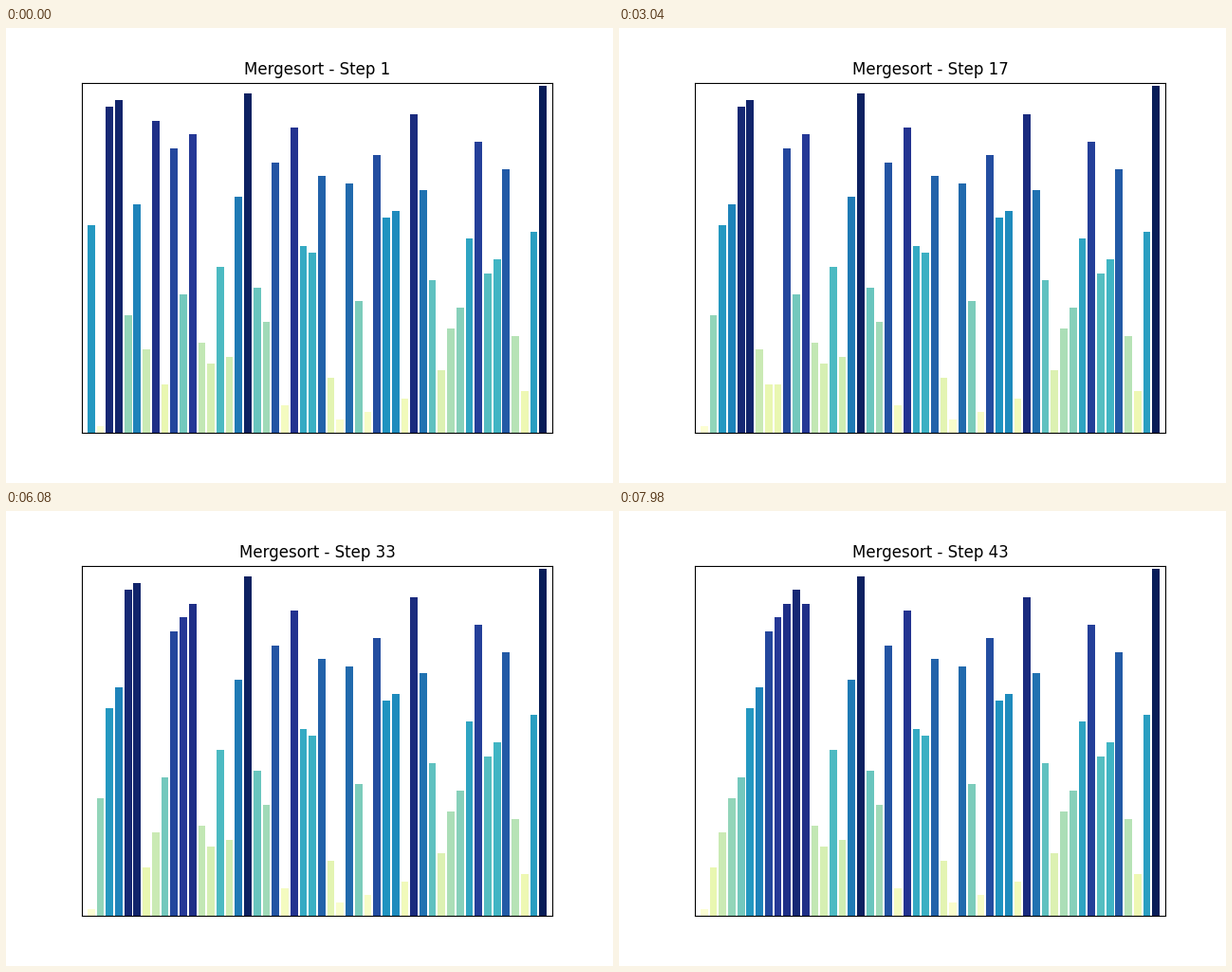
A matplotlib script for the animation above (8000 ms loop, 640 by 480 pixels).

```python
from itertools import islice

import matplotlib.pyplot as plt
from matplotlib.animation import FuncAnimation

LOOP_MS, TICK_MS, STEP_MS = 8000, 20, 190

START = [30, 1, 47, 48, 17, 33, 12, 45, 7, 41,
         20, 43, 13, 10, 24, 11, 34, 49, 21, 16,
         39, 4, 44, 27, 26, 37, 8, 2, 36, 19,
         3, 40, 31, 32, 5, 46, 35, 22, 9, 15,
         18, 28, 42, 23, 25, 38, 14, 6, 29, 50]


def merge_sort(a, lo, hi):
    """Sort a[lo:hi] in place, yielding a copy after every write."""
    if hi - lo < 2:
        return
    mid = (lo + hi) // 2
    yield from merge_sort(a, lo, mid)
    yield from merge_sort(a, mid, hi)
    left, right = a[lo:mid], a[mid:hi]
    for k in range(lo, hi):
        take_left = left and (not right or left[0] <= right[0])
        a[k] = (left if take_left else right).pop(0)
        yield a.copy()


n = len(START)
step_count = -(-LOOP_MS // STEP_MS)
states = list(islice(merge_sort(START.copy(), 0, n), step_count))
colors = [plt.cm.YlGnBu(v / n) for v in range(n + 1)]

fig, ax = plt.subplots(figsize=(6.4, 4.8), dpi=100)
bars = ax.bar(range(n), START)
ax.set_xlim(-1, n)
ax.set_ylim(0, n * 1.01)
ax.set_xticks([])
ax.set_yticks([])
title = ax.set_title("")


def draw(frame):
    # Half a tick of lead rounds each step to the nearest tick.
    step = (frame * TICK_MS + TICK_MS // 2) // STEP_MS
    for bar, value in zip(bars, states[step]):
        bar.set_height(value)
        bar.set_facecolor(colors[value])
    title.set_text(f"Mergesort - Step {step + 1}")
    return [*bars, title]


anim = FuncAnimation(fig, draw, frames=LOOP_MS // TICK_MS, interval=TICK_MS,
                     init_func=lambda: draw(0), repeat=True, repeat_delay=0)
plt.show()
```
